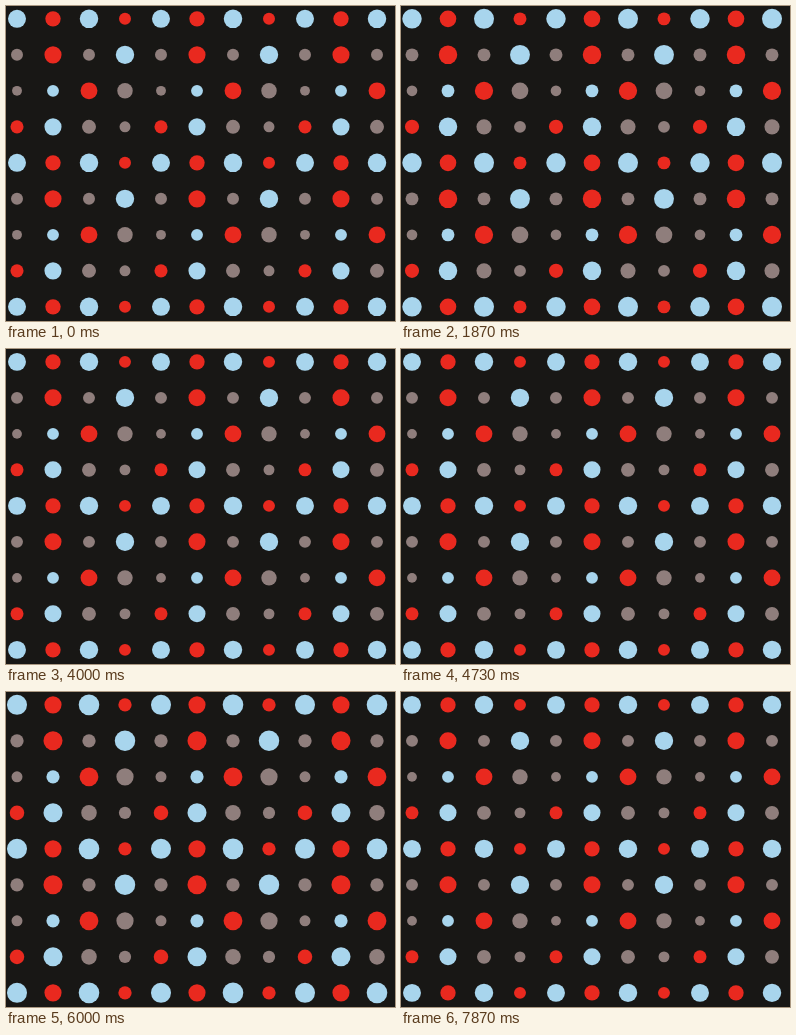
An HTML page that plays this animation: 389x315 px, repeating every 8 s.

```html
<!DOCTYPE html>
<html lang="en">
<head>
<meta charset="utf-8">
<title>Pulsing dots</title>
<style>
  html, body { margin: 0; width: 100%; height: 100%; overflow: hidden; background: #181715; }
  svg { display: block; width: 100vw; height: 100vh; }
</style>
</head>
<body>
<svg id="stage" viewBox="0 0 389 315"></svg>
<script>
const LOOP = 8000;
const STEP = 1000 / 15;
const PERIOD = 784;
const SMALLEST_AT = 7895;
const GROWTH = 0.128;
const COLS = 11, ROWS = 9, GAP = 36;

const B = '#a8d5ed', R = '#e9291f', G = '#8f7e7c';

// Repeating 4 x 4 tile: colour and smallest radius
const TILE = [
  [[B, 8.95], [R, 7.65], [B, 9.2], [R, 5.95]],
  [[G, 5.95], [R, 8.5], [G, 5.95], [B, 9.15]],
  [[G, 4.9], [B, 5.9], [R, 8.4], [G, 7.7]],
  [[R, 6.5], [B, 8.5], [G, 6.95], [G, 5.45]]
];

const stage = document.getElementById('stage');
const dots = [];

for (let row = 0; row < ROWS; row++) {
  for (let col = 0; col < COLS; col++) {
    const [fill, radius] = TILE[row % 4][col % 4];
    const node = document.createElementNS('http://www.w3.org/2000/svg', 'circle');
    node.setAttribute('cx', 11 + col * GAP);
    node.setAttribute('cy', 12.85 + row * GAP);
    node.setAttribute('fill', fill);
    stage.appendChild(node);
    dots.push({ node, radius });
  }
}

function draw(time) {
  // Hold each pose for one step; the small offset absorbs rounded times
  const held = Math.floor((time % LOOP) / STEP + 0.1) * STEP;
  const swell = (1 - Math.cos((held - SMALLEST_AT) / PERIOD * 2 * Math.PI)) / 2;
  const scale = 1 + GROWTH * swell;
  for (const { node, radius } of dots) {
    node.setAttribute('r', (radius * scale).toFixed(3));
  }
}

const start = performance.now();
function tick() {
  draw(performance.now() - start);
  requestAnimationFrame(tick);
}
draw(0);
requestAnimationFrame(tick);
</script>
</body>
</html>
```
